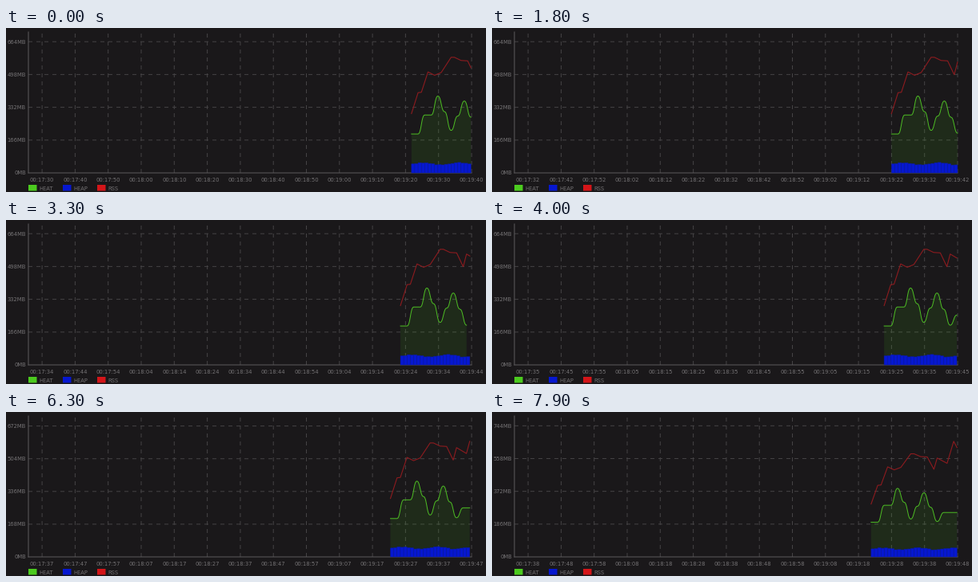
Write a matplotlib script that moves like this. It is 600x206 px and loops after 8 s.

```python
import numpy as np
import matplotlib.pyplot as plt
from matplotlib.animation import FuncAnimation
from matplotlib.collections import PolyCollection
from matplotlib.patches import Rectangle

W, H, DPI = 600, 206, 100
FRAMES, STEP_MS = 80, 100
PX = 72 / DPI  # one pixel in points
LEFT, RIGHT, TOP, BASE = 28, 582, 5, 182
PX_PER_SEC = 4.13
PEAK_HEIGHT = 145.2  # the highest RSS value always reaches this height
BG, GRID, AXIS, TEXT = "#1a181a", "#454345", "#5c5a5c", "#747274"
GREEN, BLUE, RED = "#4ccb1f", "#0617d0", "#d41519"
GREEN_LINE, RED_LINE, SEAM = "#4dbb24", "#8e1b1f", "#0a1aa0"
FIRST = 22.78  # clock second of the first sample
SAMPLES = 27

# Turning points of the RSS curve: (second, MB)
RSS_KEYS = [(0, 300), (2, 406), (3, 408), (5, 511), (7, 494), (9, 508),
            (12, 585), (13, 585), (15, 569), (17, 567), (19, 497), (20, 561),
            (23, 531), (25, 656), (26, 620)]


def heat_mb(k):
    """Two stairs up, a settling wave, then a plateau."""
    stairs = 197 + 96 * (k // 2)
    wave = 280 + 30 * 0.5 ** (k - 5.0) + 80 * np.cos(np.pi / 2 * k)
    return np.where(k <= 4, stairs, np.where(k <= 10, wave, 252))


def heap_mb(j):
    ripple = np.random.default_rng(4).uniform(-2, 2, len(j))
    return 45.5 + 5.5 * np.cos(2 * np.pi * (j - 3.2) / 10.6) + ripple


seconds = np.arange(SAMPLES)
RSS = np.interp(seconds, *zip(*RSS_KEYS))
HEAP = heap_mb(seconds)
HEAT = heat_mb(np.arange(SAMPLES // 2 + 1))


def clock(frame):
    return 40.98 + 1.01 * frame * STEP_MS / 1000


def smooth(x, y, n=14):
    """Bezier joins with level tangents at every sample."""
    s = np.linspace(0, 1, n)
    u, v = 1.5 * s * (1 - s) + s**3, s * s * (3 - 2 * s)
    xs = x[:-1, None] + np.diff(x)[:, None] * u
    ys = y[:-1, None] + np.diff(y)[:, None] * v
    return xs.ravel(), ys.ravel()


plt.rcParams["font.family"] = "DejaVu Sans"
fig = plt.figure(figsize=(W / DPI, H / DPI), dpi=DPI, facecolor=BG)
ax = fig.add_axes([0, 0, 1, 1])
ax.set_xlim(0, W)
ax.set_ylim(H, 0)
ax.axis("off")


def label(x, y, s, ha):
    return ax.text(x, y, s, color=TEXT, fontsize=6.8 * PX, ha=ha,
                   va="center_baseline")


def rule(xs, ys, color=GRID, dash=(0, (5, 5))):
    return ax.plot(xs, ys, color=color, lw=PX, ls=dash, snap=False,
                   dash_capstyle="butt", zorder=1)[0]


ticks_x = RIGHT - 10 * PX_PER_SEC * np.arange(13, -1, -1)
for x in ticks_x:
    rule([x, x], [BASE, TOP])
rows = [rule([LEFT, RIGHT], [BASE, BASE]) for _ in range(4)]
rule([LEFT, LEFT], [TOP, BASE], AXIS, "-")
rule([LEFT, RIGHT], [BASE, BASE], AXIS, "-")

time_labels = [label(x, 190.7, "", "center") for x in ticks_x]
size_labels = [label(25, BASE, "", "right") for _ in range(5)]

for x, color, name in ((28, GREEN, "HEAT"), (71, BLUE, "HEAP"),
                       (114, RED, "RSS")):
    ax.add_patch(Rectangle((x, 197), 10.5, 7.5, fc=color, lw=0, snap=False))
    label(x + 13, 201.2, name, "left")

area = ax.fill([0, 0, 0], [0, 0, 0], color=GREEN, alpha=0.11, lw=0,
               zorder=2)[0]
bars = PolyCollection([], facecolors=BLUE, edgecolors=SEAM,
                      linewidths=0.5 * PX, zorder=4)
bars.set_snap(False)
ax.add_collection(bars)
heat_line, = ax.plot([], [], color=GREEN_LINE, lw=PX, zorder=3)
rss_line, = ax.plot([], [], color=RED_LINE, lw=PX * 1.1, zorder=3)


def update(frame):
    now = clock(frame)
    n = int(now - FIRST) + 1
    m = (n + 1) // 2
    start = RIGHT - PX_PER_SEC * (now - FIRST)
    x = start + PX_PER_SEC * np.arange(n)
    peak = RSS[:n].max()
    step = 2 * round(peak * 0.1418)

    def to_y(mb):
        return BASE - mb * PEAK_HEIGHT / peak

    for i, text in enumerate(size_labels):
        text.set_y(to_y(step * i))
        text.set_text(f"{step * i}MB")
    for i, row in enumerate(rows, 1):
        row.set_ydata([to_y(step * i)] * 2)
    for i, text in enumerate(time_labels):
        sec = 19 * 60 + int(now) - 10 * (13 - i)
        text.set_text(f"00:{sec // 60:02d}:{sec % 60:02d}")

    hx, hy = smooth(x[::2], to_y(HEAT[:m]))
    heat_line.set_data(hx, hy)
    area.set_xy(np.column_stack([np.r_[hx[0], hx, hx[-1]],
                                 np.r_[BASE, hy, BASE]]))
    rss_line.set_data(x, to_y(RSS[:n]))
    bars.set_verts([[(a, BASE), (a, y), (b, y), (b, BASE)]
                    for a, b, y in zip(x, x[1:], to_y(HEAP[:n]))])
    return []


anim = FuncAnimation(fig, update, frames=FRAMES, interval=STEP_MS,
                     init_func=lambda: update(0), repeat=True,
                     repeat_delay=0, blit=False)
plt.show()
```
